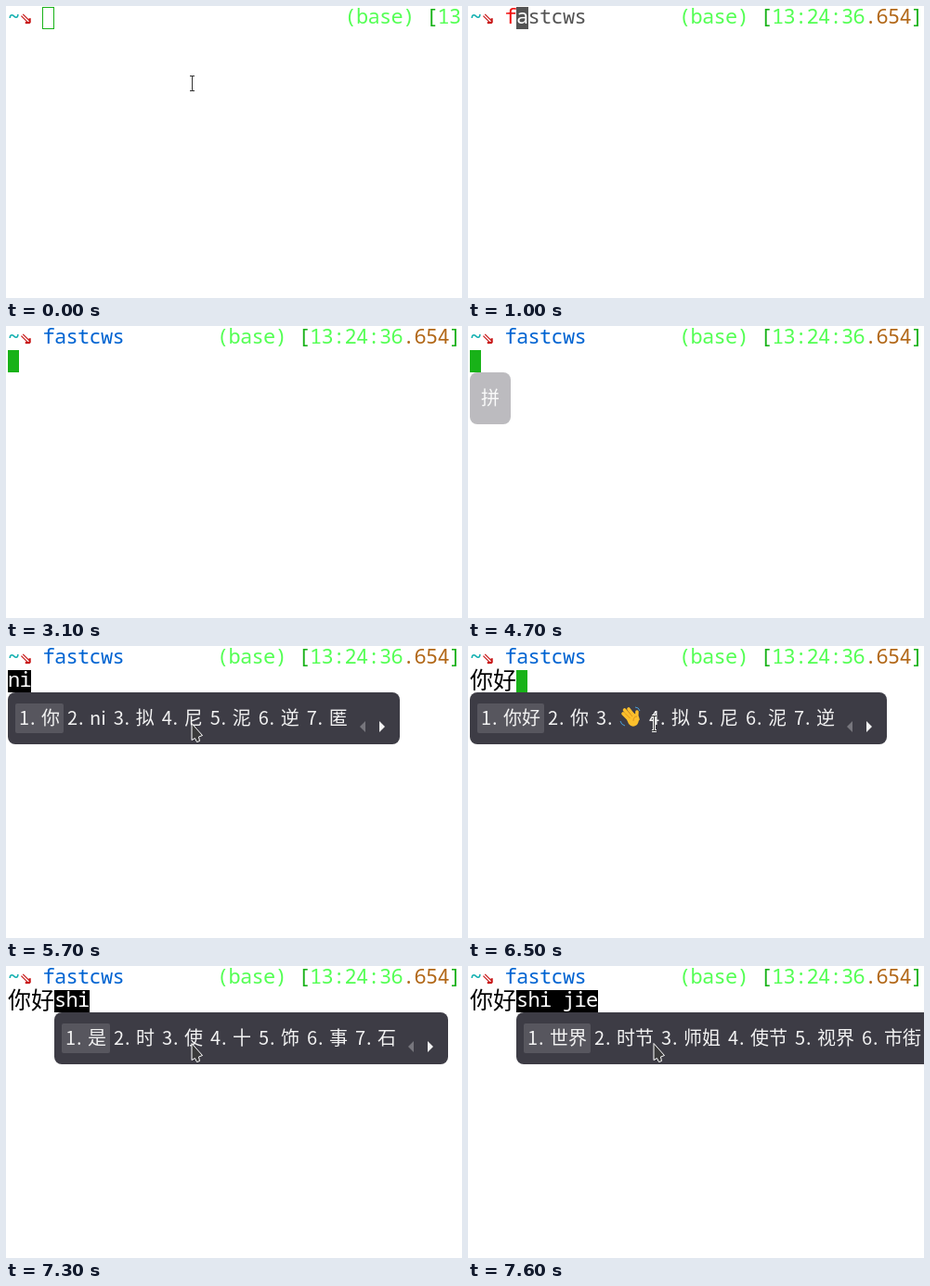
Recreate the animation shown at these times as an HTML page. Size 491 by 315 pixels, loop 8000 ms.

```html
<!DOCTYPE html>
<html lang="zh">
<head>
<meta charset="utf-8">
<title>Terminal input</title>
<style>
  html, body { margin: 0; width: 100%; height: 100%; overflow: hidden; background: #fff; }
  #stage { position: relative; width: 491px; height: 315px; overflow: hidden; }
  .row {
    position: absolute; left: 2px; height: 24px; display: flex; white-space: pre;
    font: 500 22px/19px "Noto Sans Mono", monospace; letter-spacing: -0.7px;
  }
  .row span { display: block; height: 24px; }
  #prompt, #side { top: 1px; }
  #line { top: 26px; }
  .teal { color: #18b2b2; font-weight: 700; }
  .arrow { color: #c81818; font: bold 23px/20px "DejaVu Sans Mono", monospace; letter-spacing: -1.35px; }
  .lime { color: #54ff54; }
  .green { color: #18b218; }
  .amber { color: #b26818; }
  .red { color: #f01010; }
  .gray { color: #545454; }
  .blue { color: #0064d2; }
  .under { color: #fff; background: #545454; }
  .block { width: 12px; background: #18b218; }
  .hollow { width: 13px; margin-left: -0.5px; box-sizing: border-box; border: 1px solid #18b218; }
  .preedit { color: #fff; background: #000; }
  .han { color: #000; font: 25px/18px "Noto Sans CJK SC", "Noto Sans CJK", sans-serif; letter-spacing: 0; }

  #popup {
    position: absolute; top: 50px; height: 56px; box-sizing: border-box; padding: 12px 8px;
    display: flex; white-space: pre; border-radius: 8px; background: #3d3c45; color: #f2f2f2;
    font: 20px/30px "Noto Sans CJK SC", "Noto Sans CJK", sans-serif;
  }
  .item { flex: none; display: flex; height: 32px; padding: 0 4px; border-radius: 2px; }
  .item.on { background: #57565e; }
  .item b { width: 24px; font-weight: 400; letter-spacing: 0.8px; }
  .item svg { width: 25px; height: 25px; margin-top: 2px; }
  .nav { flex: none; width: 44px; height: 32px; }
  #mouse { position: absolute; left: 190px; top: 70px; width: 30px; height: 40px; }
</style>
</head>
<body>
<div id="stage">
  <div id="prompt" class="row"></div>
  <div id="side" class="row"><span class="lime">(base) </span><span class="green">[</span><span class="lime">13:24:36</span><span class="amber">.654</span><span class="green">]</span></div>
  <div id="line" class="row"></div>
  <div id="popup"></div>
  <svg id="mouse" viewBox="190 70 30 40">
    <g id="beam" fill="none">
      <path d="M198 75.5h5M198 91.5h5M200.5 75v17" stroke="#fff" stroke-width="3"/>
      <path d="M198 75.5h5M198 91.5h5M200.5 75v17" stroke="#333"/>
    </g>
    <path id="pointer" d="M200 83.5V101.5L203.5 99.5L205.5 103.5L208.5 102.5L207.5 98L211.5 96.5Z" fill="#3a3a3a" stroke="#fff" stroke-linejoin="round"/>
  </svg>
</div>
<script>
const LOOP = 8000, CELL = 12.5;
const $ = id => document.getElementById(id);
const span = (cls, text = '') => `<span class="${cls}">${text}</span>`;

const WAVE = `<svg viewBox="0 0 25 25"><g fill="none" stroke="#fbbf2c" stroke-width="3.6" stroke-linecap="round">
  <path d="M5 9l7 7M6.500 5l8 9M11 4l7 9M20 7q-1 4 1 8"/></g>
  <path d="M8 13l8-5 5 4q2 5-1 9-5 4-9-1z" fill="#fbbf2c"/>
  <path d="M7.500 9l5 5M10 6l5 6M20 12q-4 0-4 5" fill="none" stroke="#d98a1c" stroke-width=".8"/>
  <path d="M2 17q1 4 5 5M18 2q4 0 5 4" fill="none" stroke="#4a9fd8" stroke-width="1"/></svg>`;
const NAV = `<svg class="nav" viewBox="0 0 44 32"><path d="M15 19v12l-6-6z" fill="#77767d"/><path d="M30 19v12l6-6z" fill="#f2f2f2"/></svg>`;

const GREET = '你好 你 👋 拟 尼 泥 逆';
const HI = span('han', '你好');

// [start, state changes]
const steps = [
  [0, { typed: 0, cursor: 'hollow', sideCol: 29, line: '', words: '', left: 2, alpha: 1, mouse: 'beam' }],
  [200, { cursor: 'block' }],
  [1000, { typed: 1, sideCol: 18, mouse: '' }],
  [1400, { typed: 2 }],
  [1600, { typed: 3 }],
  [1900, { typed: 4 }],
  [2200, { typed: 5 }],
  [2400, { typed: 6 }],
  [2700, { typed: 7 }],
  [3100, { cursor: '', line: span('block') }],
  [4700, { words: '拼', alpha: 0.34 }],
  [4800, { alpha: 1 }],
  [5700, { line: span('preedit', 'ni'), words: '你 ni 拟 尼 泥 逆 匿', mouse: 'pointer' }],
  [5900, { line: span('preedit', 'ni h'), words: '你好 你会 你还 你和 你 拟 尼' }],
  [6000, { line: span('preedit', 'ni ha'), words: '你哈 你好 👋 你 拟 尼 泥' }],
  [6200, { line: span('preedit', 'ni hao'), words: GREET }],
  [6500, { line: HI + span('block'), mouse: 'beam' }],
  [6900, { line: HI + span('preedit', 's'), words: '是 说 上 所 所以 时 三', left: 52, alpha: 0.34, mouse: 'pointer' }],
  [7000, { alpha: 1 }],
  [7100, { line: HI + span('preedit', 'sh'), words: '是 上 说 时候 生活 水 十' }],
  [7300, { line: HI + span('preedit', 'shi'), words: '是 时 使 十 饰 事 石' }],
  [7400, { line: HI + span('preedit', 'shi j'), words: '世界 时间 实际 事件 世纪 时节 视觉' }],
  [7500, { line: HI + span('preedit', 'shi ji'), words: '实际 世纪 时机 事迹 史记 十几 试剂' }],
  [7600, { line: HI + span('preedit', 'shi jie'), words: '世界 时节 师姐 使节 视界 市街 世姐' }],
];

function command({ typed, cursor }) {
  const word = 'fastcws';
  const done = span(typed === word.length ? 'blue' : 'red', word.slice(0, typed));
  if (typed && typed < word.length)
    return done + span('under', word[typed]) + span('gray', word.slice(typed + 1));
  return done + (cursor && span(cursor));
}

function candidates(words) {
  if (words === '拼') return span('item', words);
  return words.split(' ').map((w, i) =>
    `<div class="item${i ? '' : ' on'}"><b>${i + 1}.</b>${w === '👋' ? WAVE : w}</div>`).join('') + NAV;
}

function draw(s) {
  $('prompt').innerHTML = span('teal', '~') + span('arrow', '⇘') + span('', ' ') + command(s);
  $('side').style.left = 2 + s.sideCol * CELL + 'px';
  // at first the prompt runs past the right edge after "13"
  $('side').style.clipPath = s.sideCol > 18 ? `inset(0 ${11 * CELL}px 0 0)` : 'none';
  $('line').innerHTML = s.line;
  const box = $('popup');
  box.style.display = s.words ? 'flex' : 'none';
  box.style.left = s.left + 'px';
  box.style.opacity = s.alpha;
  box.innerHTML = candidates(s.words);
  for (const id of ['beam', 'pointer']) $(id).style.display = s.mouse === id ? '' : 'none';
}

let state = 0;
const states = steps.map(([at, change]) => ({ at, ...(state = { ...state, ...change }) }));
let shown;
function tick(now) {
  const t = now % LOOP;
  const s = states.findLast(e => e.at <= t);
  if (s !== shown) draw(shown = s);
  requestAnimationFrame(tick);
}
tick(performance.now());
</script>
</body>
</html>
```
